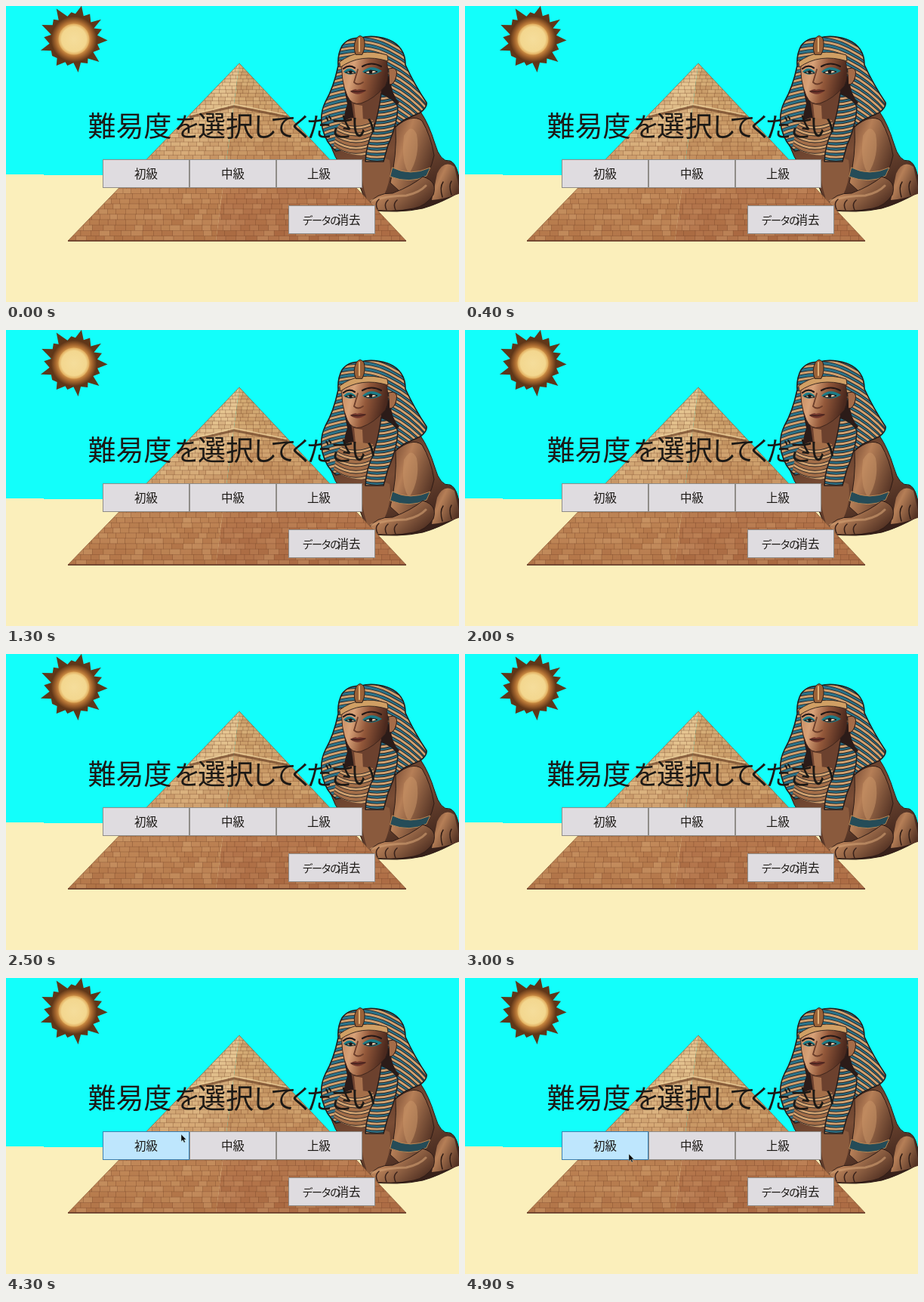
Write an HTML page that moves like this. It is 600 by 392 pixels and loops after 5 s.

```html
<!DOCTYPE html>
<html lang="ja">
<head>
<meta charset="utf-8">
<style>
  html, body { margin: 0; width: 100%; height: 100%; overflow: hidden; background: #12fffb; }
  svg { display: block; width: 100%; height: 100%; }
  text { font-family: "Noto Sans CJK JP Light", "Noto Sans CJK JP", "Noto Sans CJK", sans-serif; font-weight: 300; fill: #1c1916; font-feature-settings: "palt"; }
  .title { font-size: 37px; font-weight: 200; }
  .kana { font-size: 35px; letter-spacing: -4.2px; }
  .button rect { fill: #dfdce0; stroke: #8f8c88; }
  .button text { font-size: 15.5px; }
  .button .narrow { font-size: 14px; letter-spacing: -1px; }
  .button.hover rect { fill: #bee6fd; stroke: #3c7fb1; }
</style>
</head>
<body>
<svg viewBox="0 0 600 392">
  <defs>
    <radialGradient id="corona" gradientUnits="userSpaceOnUse" cx="90" cy="44" r="46">
      <stop offset=".42" stop-color="#d69a4c"/>
      <stop offset=".52" stop-color="#a9692f"/>
      <stop offset=".66" stop-color="#5f3618"/>
      <stop offset="1" stop-color="#5a3a1e"/>
    </radialGradient>
    <radialGradient id="disc">
      <stop offset="0" stop-color="#f5dd9b"/>
      <stop offset=".8" stop-color="#f3d78f"/>
      <stop offset="1" stop-color="#e0ab5c"/>
    </radialGradient>
    <linearGradient id="leftStone" x2="0" y2="1">
      <stop offset="0" stop-color="#e8cb98"/>
      <stop offset=".45" stop-color="#d6ac79"/>
      <stop offset=".7" stop-color="#c08757"/>
      <stop offset="1" stop-color="#b4774a"/>
    </linearGradient>
    <linearGradient id="rightStone" x2="0" y2="1">
      <stop offset="0" stop-color="#d3ab74"/>
      <stop offset=".45" stop-color="#c79663"/>
      <stop offset=".7" stop-color="#b87a4f"/>
      <stop offset="1" stop-color="#ad6d45"/>
    </linearGradient>
    <linearGradient id="skin" x2="1" y2=".25">
      <stop offset="0" stop-color="#c58a5e"/>
      <stop offset=".3" stop-color="#d8a278"/>
      <stop offset=".6" stop-color="#93583a"/>
      <stop offset="1" stop-color="#4b291e"/>
    </linearGradient>
    <linearGradient id="bodyStone" x2=".6" y2="1">
      <stop offset="0" stop-color="#513124"/>
      <stop offset=".5" stop-color="#7a4d35"/>
      <stop offset="1" stop-color="#38211a"/>
    </linearGradient>
    <linearGradient id="limb" x2="1" y2=".6">
      <stop offset="0" stop-color="#6c412d"/>
      <stop offset=".4" stop-color="#b67f57"/>
      <stop offset="1" stop-color="#523123"/>
    </linearGradient>
    <path id="hood" d="M470 42Q452 42 445 53Q439 64 440 79Q434 108 423 127Q415 143 419 162Q424 182 437 192L449 190L500 172L527 151L549 141Q558 134 557 128Q541 104 529 78Q529 53 505 44Q486 38 470 42Z"/>
    <path id="lappet" d="M497 116Q516 124 519 134Q518 158 506 184L500 206H476Q477 184 486 166Q493 145 497 116Z"/>
    <path id="collar" d="M439 160Q449 148 462 148L486 151L489 166L478 198Q450 198 434 185Z"/>
    <clipPath id="hoodClip"><use href="#hood"/></clipPath>
    <clipPath id="lappetClip"><use href="#lappet"/></clipPath>
    <clipPath id="collarClip"><use href="#collar"/></clipPath>
    <clipPath id="leftClip"><path d="M309 76L278 311H82Z"/></clipPath>
    <clipPath id="rightClip"><path d="M309 76L530 311H278Z"/></clipPath>
  </defs>

  <rect width="600" height="392" fill="#12fffb"/>
  <path d="M0 223H50V224H600V392H0Z" fill="#fbefbb"/>

  <path id="rays" fill="url(#corona)"/>
  <circle cx="90" cy="44" r="20.5" fill="url(#disc)"/>

  <g stroke-linejoin="round" stroke-linecap="round">
    <path d="M430 185L500 150L549 140Q560 156 568 182Q575 207 588 205Q600 209 602 246Q574 262 552 268Q520 275 480 270L470 242Q440 215 430 185Z" fill="url(#bodyStone)" stroke="#2a1914"/>
    <path d="M571 222Q580 203 594 213L602 248Q580 256 564 257Z" fill="url(#limb)"/>
    <path d="M578 253Q574 240 579 233M590 250Q586 238 590 232" fill="none" stroke="#2f1c15" stroke-width="1.5"/>
    <path d="M472 206Q492 196 508 204Q512 228 500 252L480 262Q468 228 472 206Z" fill="#8a5a3d"/>
    <path d="M516 160Q538 142 551 152Q563 172 567 198Q562 222 547 238L522 246L509 234Q518 198 516 160Z" fill="url(#limb)" stroke="#2f1c16"/>
    <path d="M527 172Q537 154 544 170Q549 198 534 222Q523 208 527 172Z" fill="#c99467" opacity=".55"/>
    <path d="M512 214Q535 226 562 214L557 225Q535 236 509 226Z" fill="#254c58" stroke="#b98754"/>
    <path d="M480 263Q490 247 512 248Q538 238 552 226Q572 232 566 250Q556 265 540 268Q510 274 480 269Z" fill="url(#limb)" stroke="#2f1c16"/>
    <path d="M484 258Q506 251 530 251Q548 247 556 238" fill="none" stroke="#d3a074" stroke-width="3" opacity=".6"/>
    <path d="M492 269Q488 261 494 256M504 270Q500 262 506 257M516 270Q512 262 518 257" fill="none" stroke="#38211a" stroke-width="1.5"/>

    <use href="#hood" fill="#2c7389"/>
    <g id="hoodStripes" clip-path="url(#hoodClip)" fill="none"></g>
    <use href="#hood" fill="none" stroke="#241d1c" stroke-width="1.6"/>
    <path d="M447 104L452 130Q445 148 447 186L492 190L507 142L521 128Q508 114 510 92Z" fill="#2b1b18"/>
    <path d="M457 124L497 110L496 152Q478 162 461 150Z" fill="#6c412e"/>
    <path d="M461 130L472 132L473 153L463 150Z" fill="#a8724e"/>
    <use href="#collar" fill="#a46f49"/>
    <g id="collarStripes" clip-path="url(#collarClip)" fill="none"></g>
    <use href="#lappet" fill="#2b6d82"/>
    <g id="lappetStripes" clip-path="url(#lappetClip)" fill="none"></g>
    <use href="#lappet" fill="none" stroke="#241d1c" stroke-width="1.5"/>

    <path d="M445 72Q470 58 503 68Q509 92 502 106Q488 123 470 129Q458 132 452 119Q443 98 445 72Z" fill="url(#skin)" stroke="#3f251c"/>
    <path d="M442 74Q468 54 505 65L506 73Q470 62 443 81Z" fill="#d09f64" stroke="#3c2a21"/>
    <path d="M447 83Q454 77 462 82M472 80Q484 73 497 80" fill="none" stroke="#241817" stroke-width="2.2"/>
    <path d="M447 87Q455 78 464 88Q455 94 447 87ZM472 87Q483 76 498 86Q483 95 472 87Z" fill="#1b7c88"/>
    <path d="M450 88Q456 84 463 89Q456 91 450 88ZM475 88Q483 83 492 87Q482 92 475 88Z" fill="#e4ceb0" stroke="#1d1616"/>
    <circle cx="456.5" cy="87.5" r="2.2" fill="#1d1615"/>
    <circle cx="483" cy="87" r="2.4" fill="#1d1615"/>
    <path d="M466 84L461 101Q466 106 473 101" fill="none" stroke="#6b3d2a" stroke-width="1.8"/>
    <path d="M456 113Q462 109 465 111Q470 109 477 112Q466 121 456 113Z" fill="#6f352b"/>
    <path d="M457 113Q466 115 476 112" fill="none" stroke="#321a17"/>
    <path d="M507 83Q520 79 517 93Q514 105 508 104Z" fill="#a56c48" stroke="#2a1a16"/>
    <path d="M463 64Q459 53 464 43Q469 36 474 43Q477 53 472 64Z" fill="#9a6238" stroke="#2e1f1a"/>
    <path d="M468 43V60" stroke="#dfb077" stroke-width="2"/>
  </g>

  <path d="M309 76L278 311H82Z" fill="url(#leftStone)"/>
  <g id="leftBricks" clip-path="url(#leftClip)"></g>
  <path d="M309 76L530 311H278Z" fill="url(#rightStone)"/>
  <g id="rightBricks" clip-path="url(#rightClip)"></g>
  <path d="M309 76L530 311H82Z" fill="none" stroke="#8a5c3a" stroke-width=".7"/>
  <path d="M82 311H530" stroke="#5f3524" stroke-width="1.6"/>
  <path d="M243 147L302 133L373 147" fill="none" stroke="#744b2e" stroke-width="3" opacity=".75"/>
  <path d="M245 144L302 130L371 144" fill="none" stroke="#ecd09b" stroke-width="1.5" opacity=".8"/>

  <text class="title" y="173"><tspan x="108.5">難易度</tspan><tspan x="223" class="kana">を</tspan><tspan x="254">選択</tspan><tspan x="327" class="kana">してください</tspan></text>

  <g class="button" id="beginner"><rect x="128.5" y="203.5" width="114" height="37"/><text x="185.5" y="227.5" text-anchor="middle">初級</text></g>
  <g class="button"><rect x="243.5" y="203.5" width="114" height="37"/><text x="300.5" y="227.5" text-anchor="middle">中級</text></g>
  <g class="button"><rect x="358.5" y="203.5" width="113" height="37"/><text x="414.5" y="227.5" text-anchor="middle">上級</text></g>
  <g class="button"><rect x="374.5" y="264.5" width="114" height="37"/><text y="288.5"><tspan class="narrow" x="393">データの</tspan><tspan x="438.5">消去</tspan></text></g>

  <path id="cursor" d="M0 0V9.5L2.2 7.6L3.8 11L5.4 10.2L3.9 7H6.8Z" fill="#080808" stroke="#d8f4f4" stroke-width=".4"/>
</svg>
<script>
const LOOP = 5000, STEP = 100;
const byId = id => document.getElementById(id);

let seed = 11;
const random = () => (seed = seed * 16807 % 2147483647) / 2147483647;
for (let i = 0; i < 5; i++) random();

function drawRays() {
  const count = 36, points = [];
  for (let i = 0; i < count; i++) {
    const angle = (i + random() * .5) / count * Math.PI * 2;
    const radius = i % 2 ? 30 + random() * 4 : i % 4 ? 36 + random() * 4 : 42 + random() * 5;
    points.push(`${90 + radius * Math.cos(angle)} ${44 + radius * Math.sin(angle)}`);
  }
  byId('rays').setAttribute('d', `M${points.join('L')}Z`);
}

function drawBricks(id, left, right) {
  let markup = '';
  for (let y = 78; y < 311;) {
    const height = 4.5 + (y - 78) * .013;
    const depth = (y + height - 76) / 235;
    const from = 309 + (left - 309) * depth, to = 309 + (right - 309) * depth;
    for (let x = from - 8 * random(); x < to;) {
      const width = height * (1.4 + random() * .7);
      const tint = random() < .5 ? '#ffe0a8' : '#8c4c29';
      markup += `<rect x="${x.toFixed(1)}" y="${y.toFixed(1)}" width="${width.toFixed(1)}" height="${height.toFixed(1)}" fill="${tint}" fill-opacity="${(random() * .15).toFixed(2)}" stroke="#6d4027" stroke-opacity=".28" stroke-width=".6"/>`;
      x += width;
    }
    y += height;
  }
  byId(id).innerHTML = markup;
}

function drawStripes(id, count, curve) {
  let markup = '';
  for (let i = 0; i < count; i++) {
    const d = curve(i);
    markup += `<path d="${d}" stroke="#201f22" stroke-width="4.6"/><path d="${d}" stroke="#d0a06e" stroke-width="2.8"/>`;
  }
  byId(id).innerHTML = markup;
}

const route = [
  { at: 3500, x: 427, y: 23 },
  { at: 4300, x: 232, y: 207 },
  { at: 4900, x: 217, y: 233 }
];

function pointerAt(time) {
  if (time < route[0].at) return null;
  const next = route.findIndex(stop => stop.at >= time);
  if (next < 0) return route[route.length - 1];
  if (next === 0) return route[0];
  const a = route[next - 1], b = route[next];
  const u = (time - a.at) / (b.at - a.at);
  const eased = u * u * (3 - 2 * u);
  return { x: a.x + (b.x - a.x) * eased, y: a.y + (b.y - a.y) * eased };
}

const cursor = byId('cursor'), beginner = byId('beginner');

function render(time) {
  const point = pointerAt(Math.floor(time / STEP) * STEP);
  cursor.style.display = point ? '' : 'none';
  if (point) cursor.setAttribute('transform', `translate(${point.x} ${point.y})`);
  const inside = point && point.x >= 128 && point.x <= 243 && point.y >= 203 && point.y <= 241;
  beginner.classList.toggle('hover', Boolean(inside));
}

drawRays();
drawBricks('leftBricks', 82, 278);
drawBricks('rightBricks', 278, 530);
drawStripes('hoodStripes', 20, i => `M412 ${52 + i * 8}Q462 ${30 + i * 8} 500 ${46 + i * 8}T564 ${96 + i * 8}`);
drawStripes('lappetStripes', 13, i => `M472 ${120 + i * 7}Q496 ${128 + i * 7} 522 ${116 + i * 7}`);
drawStripes('collarStripes', 6, i => `M430 ${148 + i * 9}Q460 ${172 + i * 9} 492 ${152 + i * 9}`);

const start = performance.now();
function tick() {
  render((performance.now() - start) % LOOP);
  requestAnimationFrame(tick);
}
tick();
</script>
</body>
</html>
```
